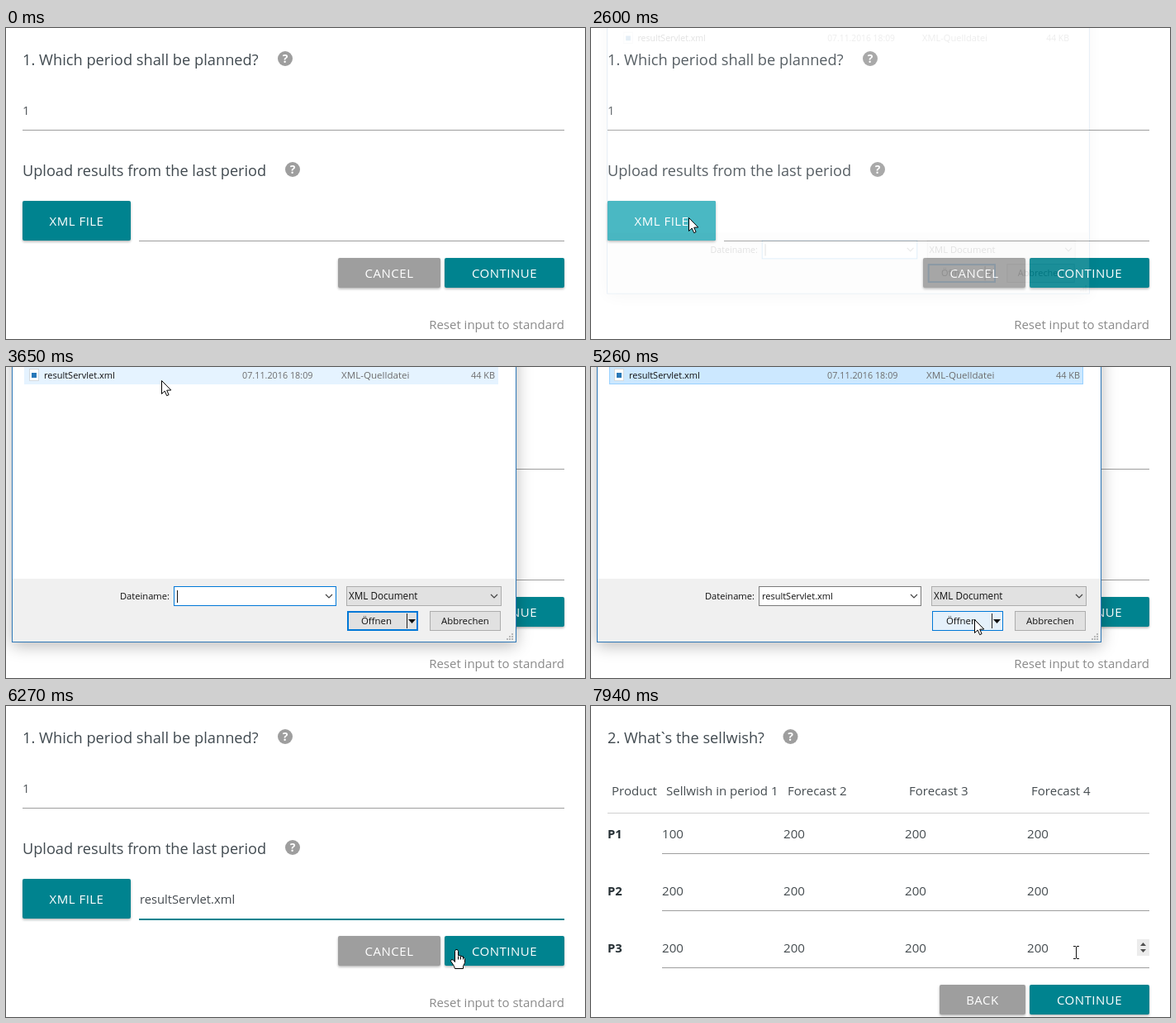
Animation of 701x376 px, one loop 7.99 s. Source, as an HTML page with a canvas:

```html
<!DOCTYPE html>
<html lang="en">
<head>
<meta charset="utf-8">
<title>Period planning form</title>
<style>
html, body { margin: 0; width: 100%; height: 100%; overflow: hidden; background: #fff; }
canvas { display: block; width: 701px; height: 376px; }
</style>
</head>
<body>
<canvas id="stage" width="701" height="376"></canvas>
<script>
const W = 701, H = 376, LOOP = 7990;
const TEAL = '#00838f', GREY = '#9e9e9e', BLUE = '#0078d7', INK = '#414a50';
const screen = document.getElementById('stage').getContext('2d');
const layer = Object.assign(document.createElement('canvas'), { width: W, height: H }).getContext('2d');
let g = screen;

const clamp = v => Math.max(0, Math.min(1, v));
const ramp = (t, a, b) => clamp((t - a) / (b - a));
const easeOut = p => 1 - (1 - p) * (1 - p);
const easeInOut = p => p * p * (3 - 2 * p);
const mix = (a, b, p) => a + (b - a) * p;

function rect(x, y, w, h, color) {
  g.fillStyle = color;
  g.fillRect(x, y, w, h);
}

function box(x, y, w, h, fill, border, line = 1) {
  rect(x, y, w, h, border);
  rect(x + line, y + line, w - 2 * line, h - 2 * line, fill);
}

function text(s, x, y, size, color, { weight = 400, align = 'left', spacing = 0 } = {}) {
  g.font = `${weight} ${size}px "Open Sans", "Noto Sans", sans-serif`;
  g.letterSpacing = spacing + 'px';
  g.textAlign = align;
  g.fillStyle = color;
  g.fillText(s, x, y);
}

function poly(points, fill, stroke) {
  g.beginPath();
  points.forEach(([x, y]) => g.lineTo(x, y));
  g.closePath();
  g.fillStyle = fill;
  g.fill();
  if (stroke) {
    g.strokeStyle = stroke;
    g.lineWidth = 1;
    g.lineJoin = 'round';
    g.stroke();
  }
}

// Draws a group off screen so that it fades as one picture.
function fade(alpha, draw, scale = 1, cx = 0, cy = 0) {
  if (alpha <= 0) return;
  g = layer;
  g.setTransform(1, 0, 0, 1, 0, 0);
  g.clearRect(0, 0, W, H);
  g.setTransform(scale, 0, 0, scale, cx * (1 - scale), cy * (1 - scale));
  draw();
  g = screen;
  g.globalAlpha = alpha;
  g.drawImage(layer.canvas, 0, 0);
  g.globalAlpha = 1;
}

function button(label, x, y, w, h, color, glow = 0) {
  g.save();
  g.shadowColor = 'rgba(0,0,0,.3)';
  g.shadowBlur = 3;
  g.shadowOffsetY = 1.5;
  g.fillStyle = color;
  g.beginPath();
  g.roundRect(x, y, w, h, 2);
  g.fill();
  g.restore();
  if (glow) {
    g.fillStyle = `rgba(50,175,187,${glow})`;
    g.fill();
  }
  text(label, x + w / 2, y + h / 2 + 5.5, 15, '#fff', { weight: 500, align: 'center', spacing: 0.5 });
}

function help(x, y) {
  g.fillStyle = GREY;
  g.beginPath();
  g.arc(x, y, 9, 0, 7);
  g.fill();
  text('?', x, y + 5.2, 14, '#fff', { weight: 700, align: 'center' });
}

function underline(x, y, focus) {
  rect(x, y, 676 - x, 1, GREY);
  if (!focus) return;
  g.save();
  g.globalAlpha *= focus;
  rect(x, y, 676 - x, 2, TEAL);
  g.restore();
}

function spinner(y) {
  rect(661, y, 15, 20, '#ececec');
  poly([[665, y + 8], [668.5, y + 4], [672, y + 8]], '#505050');
  poly([[665, y + 12], [668.5, y + 16], [672, y + 12]], '#505050');
}

function uploadPage(t) {
  rect(0, 0, W, H, '#fff');
  text('1. Which period shall be planned?', 20, 45, 18.25, INK);
  help(338, 37);
  text('1', 20, 105, 15, '#50565a');
  if (t >= 700 && t < 2200) spinner(90);
  if (t >= 1110 && t < 1640) rect(29, 92, 1, 16, '#222');
  underline(20, 123, ramp(t, 1080, 1290) * (1 - ramp(t, 2110, 2360)));

  text('Upload results from the last period', 20, 179, 18.15, INK);
  help(347, 171);
  const glow = t >= 2600 ? 1 - ramp(t, 6070, 6220) : 0;
  button('XML FILE', 20, 209, 131, 48, TEAL, glow);
  if (t >= 5540) text('resultServlet.xml', 162, 239, 14.75, '#454b50');
  underline(161, 257, ramp(t, 5540, 5810));
  button('CANCEL', 402, 278, 124, 36, GREY);
  button('CONTINUE', 531, 278, 145, 36, TEAL);
  text('Reset input to standard', 676, 364, 15, '#8a8a8a', { align: 'right' });
}

function sellPage(t) {
  rect(0, 0, W, H, '#fff');
  text('2. What', 20, 45, 18.2, INK);
  text('`', 82, 45, 18.2, INK);
  text('s the sellwish?', 89.5, 45, 18.2, INK);
  help(241.5, 37);
  const cols = [86, 233, 380, 528];
  ['Sellwish in period 1', 'Forecast 2', 'Forecast 3', 'Forecast 4']
    .forEach((s, i) => text(s, cols[i] + 5, 108, 15.05, '#454c50'));
  text('Product', 25, 108, 15.05, '#454c50');
  rect(20, 129, 656, 1, '#d0d0d0');
  for (let row = 0; row < 3; row++) {
    const y = 160 + row * 69;
    text('P' + (row + 1), 20, y, 14.8, '#263035', { weight: 700 });
    cols.forEach((x, i) => text(row + i ? '200' : '100', x, y, 15.1, '#454c50'));
    rect(86, y + 18, 590, 1, GREY);
  }
  if (t >= 7760) spinner(282);
  button('BACK', 422, 337, 104, 36, GREY);
  button('CONTINUE', 531, 337, 145, 36, TEAL);
}

function chevron(x, y) {
  g.strokeStyle = '#444';
  g.lineWidth = 1.2;
  g.beginPath();
  g.moveTo(x - 4, y - 2);
  g.lineTo(x, y + 2);
  g.lineTo(x + 4, y - 2);
  g.stroke();
}

function fileRow(t, mouse) {
  if (t >= 3850) box(22, -2, 574, 23, '#cce8ff', '#99d1ff');
  else if (t > 3070 && mouse.y < 22) rect(22, 0, 574, 21, '#e5f3ff');
  box(28, 2, 12, 15, '#fff', '#d5dbe0');
  rect(31, 7, 6, 6, '#2878b8');
  text('resultServlet.xml', 46, 14, 11, '#111');
  text('07.11.2016 18:09', 286, 14, 10.8, '#6d6d6d');
  text('XML-Quelldatei', 406, 14, 11.6, '#6d6d6d');
  text('44 KB', 592, 14, 10.9, '#6d6d6d', { align: 'right' });
}

function dialog(t, mouse) {
  g.save();
  g.shadowColor = 'rgba(0,0,0,.28)';
  g.shadowBlur = 18;
  g.shadowOffsetY = 4;
  rect(7, -40, 611, 373, '#2f78b7');
  g.restore();
  rect(8, -40, 609, 372, '#fff');
  rect(8, 256, 609, 76, '#f0f0f0');
  fileRow(t, mouse);

  const chosen = t >= 3850, typing = t < 4050;
  text('Dateiname:', 138, 281, 11.15, '#111');
  box(203, 265, 197, 24, '#fff', typing ? BLUE : '#7a7a7a');
  if (chosen) text('resultServlet.xml', 207, 281, 11, '#111');
  if (typing && (t < 3070 || t >= 3600)) rect(207, 270, 1, 15, '#111');
  chevron(391, 277);

  const overType = t > 4450 && mouse.x >= 412 && mouse.y >= 265 && mouse.y < 289;
  box(412, 265, 188, 24, overType ? '#e5f1fb' : '#e1e1e1', overType ? BLUE : '#adadad');
  text('XML Document', 415, 281, 11.7, '#111');
  chevron(591, 277);

  const overOpen = t > 4450 && mouse.y >= 295;
  const openFill = t >= 5310 ? '#cce4f7' : overOpen ? '#e5f1fb' : '#e1e1e1';
  box(413, 295, 86, 24, openFill, BLUE, overOpen ? 1 : 2);
  text('Öffnen', 430, 311, 11.4, '#111');
  rect(485, 298, 1, 18, '#222');
  poly([[487, 305], [496, 305], [491.5, 310]], '#111');
  box(513, 295, 86, 24, '#e1e1e1', '#adadad');
  text('Abbrechen', 527, 311, 11.4, '#111');
  for (let i = 0; i < 3; i++)
    for (let j = 0; j <= i; j++) rect(606 + i * 3, 328 - j * 3, 2, 2, '#b8b8b8');
}

// Pointer stops: time, x, y.
const path = [
  [160, 455, 338], [290, 114, 174], [520, 114, 174], [820, 133, 97],
  [1470, 133, 97], [1950, 118, 229], [3050, 118, 229], [3650, 188, 16],
  [4030, 188, 16], [4450, 409, 268], [4630, 409, 268], [5200, 464, 305],
  [6060, 464, 305], [6270, 545, 294], [6660, 587, 298], [LOOP, 587, 298]
];

function pointer(t) {
  if (t < path[0][0]) return { x: -99, y: -99 };
  const i = path.findIndex(k => t < k[0]);
  const [t0, x0, y0] = path[i - 1], [t1, x1, y1] = path[i];
  const p = easeInOut(ramp(t, t0, t1));
  return { x: mix(x0, x1, p), y: mix(y0, y1, p) };
}

function arrow() {
  poly([[0, 0], [0, 16], [3.7, 12.6], [6.2, 18.2], [8.6, 17.1], [6.2, 11.7], [11.3, 11.5]], '#fff', '#000');
}

function hand() {
  poly([[-2, 2], [-1, 0], [1, 0], [2, 2], [2, 7], [5, 7.5], [8, 9], [10, 11], [10, 16], [8, 20],
    [8, 23], [-2, 23], [-3, 20], [-7, 14], [-6, 12], [-4, 12.5], [-2, 15]], '#fff', '#000');
  for (const x of [2, 5, 8]) rect(x - 0.5, 8, 1, 4, '#000');
}

function beam() {
  rect(0, -7, 1, 14, '#111');
  for (const y of [-8, 7]) {
    rect(-3, y, 3, 1, '#111');
    rect(1, y, 3, 1, '#111');
  }
}

function cursor(t, { x, y }) {
  const inField = t < 2000 && y > 80 && y < 124;
  const onButton = t > 5600 && t < 7060 && (x < 526 || x >= 531);
  g.save();
  g.translate(Math.round(x) + 0.5, Math.round(y) + 0.5);
  if (inField || t >= 7060) {
    g.translate(-0.5, -0.5);
    beam();
  } else if (onButton) hand();
  else arrow();
  g.restore();
}

function draw(t) {
  const mouse = pointer(t);
  g = screen;
  if (t < 6920) {
    uploadPage(t);
  } else {
    rect(0, 0, W, H, '#ededed');
    fade(1 - ramp(t, 6890, 7060), () => uploadPage(t));
    fade(easeOut(ramp(t, 7092, 7820)), () => sellPage(t));
  }
  if (t >= 2600 && t < 5720) {
    const open = ramp(t, 2570, 2830), close = ramp(t, 5460, 5720);
    const scale = 1 - 0.0555 * (1 - easeOut(open)) - 0.055 * close * close;
    fade(open * (1 - close), () => dialog(t, mouse), scale, 290, 65);
  }
  cursor(t, mouse);
}

const start = performance.now();
function tick() {
  draw((performance.now() - start) % LOOP);
  requestAnimationFrame(tick);
}
tick();
</script>
</body>
</html>
```
